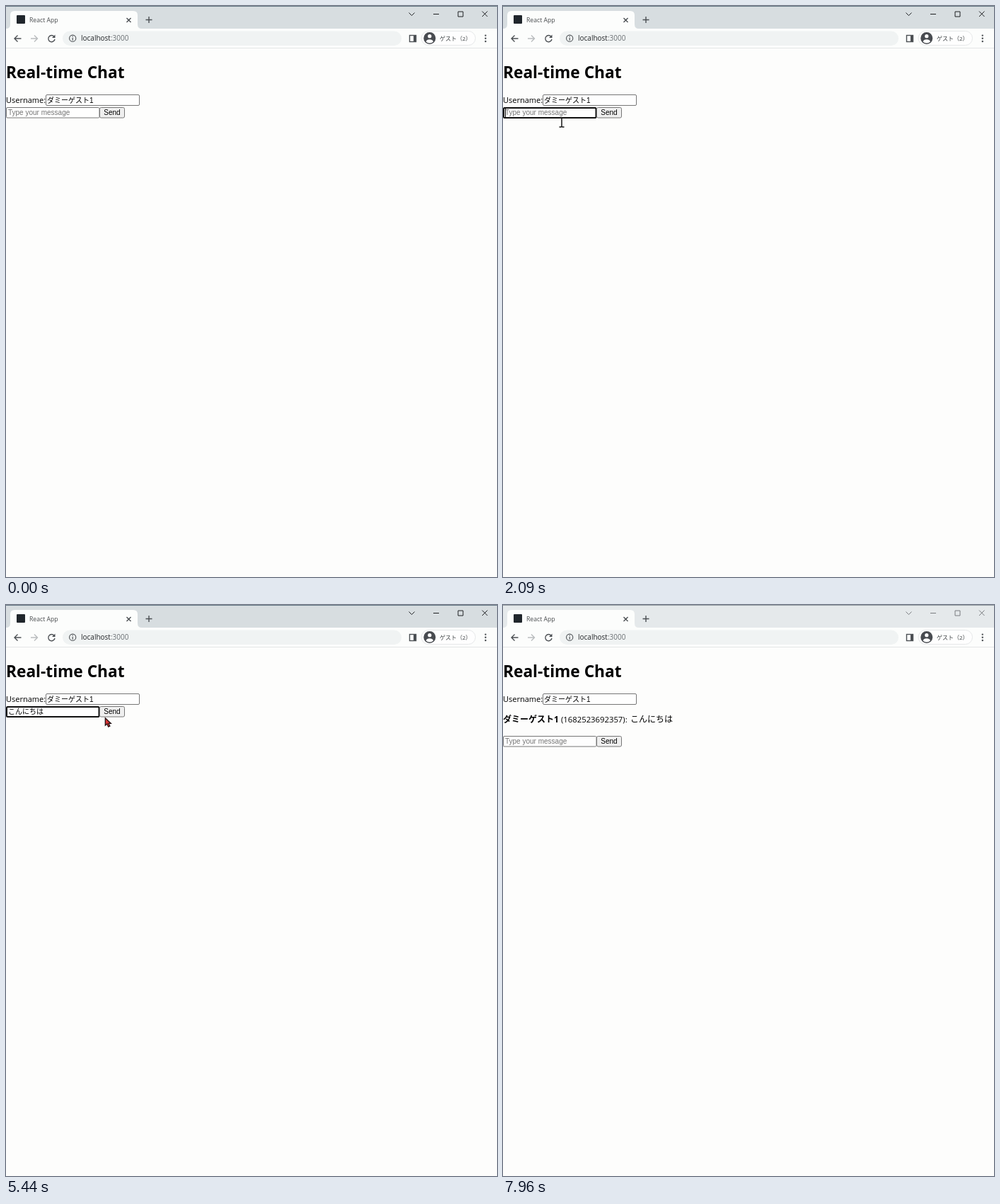
Animation, 694 px wide and 807 px high, one loop 8000 ms. Source, as an HTML page:

```html
<!DOCTYPE html>
<html lang="ja">
<head>
<meta charset="utf-8">
<title>Real-time Chat</title>
<style>
  html, body { margin: 0; width: 100%; height: 100%; overflow: hidden; background: #fdfdfc; }
  svg { display: block; }
  text { white-space: pre; }
  .ui { font-family: "Open Sans", "Noto Sans CJK JP", "Noto Sans CJK", sans-serif; }
  .field { font: 10px "Liberation Sans", "Noto Sans CJK JP", "Noto Sans CJK", sans-serif; }
  .line { fill: none; stroke: #4c5054; stroke-width: 1.4; }
  .box { fill: #fefefe; stroke: #767676; }
</style>
</head>
<body>
<svg width="694" height="807" viewBox="0 0 694 807">
  <!-- Browser frame -->
  <rect id="strip" width="694" height="32"/>
  <rect id="edge" width="694" height="1"/>
  <path d="M0 32Q6 32 6 26V13Q6 7 12 7H180Q186 7 186 13V26Q186 32 192 32Z" fill="#fcfdfc"/>
  <rect y="32" width="694" height="27" fill="#fcfdfc"/>
  <rect y="59" width="694" height="1" fill="#e3e6e6"/>
  <rect x="15" y="13" width="12" height="12" rx="1" fill="#20262c"/>
  <text class="ui" x="33" y="23" font-size="8.7" fill="#4a4d50">React App</text>
  <path class="line" d="M170.500 17l6 6m0-6l-6 6M197.500 19.500h9m-4.500-4.500v9" stroke="#333"/>
  <g id="controls" fill="none">
    <path d="M569.500 9.500l4 4 4-4M604 11.500h8M639 8h7v7h-7zM673 7.500l7.500 7.500m0-7.500l-7.500 7.500"/>
  </g>
  <path class="line" d="M21.500 46H12m4.500-4.500L12 46l4.500 4.500"/>
  <path class="line" d="M35 46h9.500m-4.500-4.500l4.500 4.500-4.500 4.500" style="stroke:#b9bcbe"/>
  <path class="line" d="M68 43.200A4.600 4.600 0 1 0 69 47"/>
  <path d="M69.500 40.500v4.500H65z" fill="#4c5054"/>
  <rect x="80" y="35.500" width="479" height="20.500" rx="10.200" fill="#f0f3f3"/>
  <circle class="line" cx="94.200" cy="45.700" r="4.600" style="stroke-width:1.100"/>
  <path class="line" d="M94.200 45v3.500M94.200 42.800v1.200" style="stroke-width:1.200"/>
  <text class="ui" x="106" y="49" font-size="10" fill="#25282b">localhost<tspan fill="#6b7074">:3000</tspan></text>
  <rect class="line" x="570.500" y="41.500" width="9" height="9"/>
  <path d="M576 41h4v10h-4z" fill="#4c5054"/>
  <rect x="587" y="35.500" width="76.500" height="20" rx="10" fill="#fefefe" stroke="#e6e8e9"/>
  <circle cx="598.800" cy="45.500" r="8.500" fill="#484b50"/>
  <circle cx="598.800" cy="42.700" r="2.600" fill="#fff"/>
  <path d="M593.600 50.200q1-3 5.200-3t5.200 3q-2 2.200-5.200 2.200t-5.200-2.200z" fill="#fff"/>
  <text class="ui" x="613" y="49" font-size="8" fill="#3c4043">ゲスト（2）</text>
  <g fill="#4c5054">
    <circle cx="677.800" cy="41.600" r="1.200"/><circle cx="677.800" cy="45.800" r="1.200"/><circle cx="677.800" cy="50" r="1.200"/>
  </g>

  <!-- Page -->
  <text class="ui" x="0" y="102" font-size="22.7" font-weight="700">Real-time Chat</text>
  <text class="ui" x="0" y="137" font-size="11">Username:</text>
  <rect class="box" x="56.500" y="125.500" width="132" height="15" rx="1.500"/>
  <text class="field" x="58" y="137">ダミーゲスト1</text>
  <g id="message" class="ui" font-size="11.3">
    <text x="0" y="166" font-size="12" font-weight="700">ダミーゲスト1</text>
    <text x="82" y="166">(1682523692357):</text>
    <text x="180" y="166" font-size="12">こんにちは</text>
  </g>
  <g id="form">
    <rect id="input" class="box" x=".5" y="143.500" width="131.500" height="14.500" rx="1.500"/>
    <rect id="ring" x="1" y="144" width="130.500" height="14" rx="1.500" fill="none" stroke="#101010" stroke-width="2"/>
    <text id="value" class="field" x="3" y="154"></text>
    <path id="underline" stroke="#333" stroke-dasharray="1 1"/>
    <rect id="caret" y="145" width="1" height="12"/>
    <rect id="button" x="132.500" y="143.500" width="35" height="14.500" rx="2" stroke="#767676"/>
    <text class="field" x="138.300" y="154">Send</text>
  </g>

  <path id="arrow" d="M.8.800V11.200L3.300 9.100 5.200 13.200 7.300 12.300 5.500 8.300H8.800Z" fill="#d93636" stroke="#241214" stroke-width="1.300"/>
  <path id="beam" d="M-3.500-6.500H-1L0-5.500 1-6.500H3.500M0-5.500V5.500M-3.500 6.500H-1L0 5.500 1 6.500H3.500" fill="none" stroke="#151515" stroke-width="1.500"/>
</svg>
<script>
const LOOP = 8000, FOCUS = 2060, PRESS = 5800, SENT = 5900, BLUR = 7560;
const $ = id => document.getElementById(id);
const show = (id, on) => $(id).style.display = on ? '' : 'none';
const set = (id, attrs) => {
  for (const name in attrs) $(id).setAttribute(name, attrs[name]);
};

// Pointer stops: time, x, y
const path = [
  [460, 1, 166], [700, 22, 180], [1160, 54, 190], [1290, 55, 191],
  [1420, 59, 200], [1560, 64, 191], [2060, 80, 158], [4880, 80, 158],
  [5060, 98, 173], [5250, 130, 171], [5440, 139.500, 159], [5670, 146, 154],
  [5970, 149.500, 152], [6170, 149.500, 152], [6500, 86, 165],
  [6900, 86, 165], [6970, 65, 168]
];

// Input method text: time, text
const typed = [
  [2880, 'ｋ'], [3000, 'こ'], [3300, 'こｎ'], [3420, 'こん'], [3560, 'こんｎ'],
  [3750, 'こんに'], [3860, 'こんにｃ'], [3980, 'こんにち'],
  [4150, 'こんにちｈ'], [4310, 'こんにちは']
];

const within = (t, from, to) => t >= from && t < to;
const mix = (a, b, k) => a + (b - a) * k;
const progress = (t, from, to) => Math.min(1, Math.max(0, (t - from) / (to - from)));
const rgb = (a, b, k) => `rgb(${a.map((v, i) => Math.round(mix(v, b[i], k)))})`;

function pointerAt(t) {
  const i = path.findIndex(p => p[0] > t);
  if (i < 1) return path[i ? path.length - 1 : 0];
  const a = path[i - 1], b = path[i];
  const k = progress(t, a[0], b[0]);
  return a.map((v, n) => mix(v, b[n], k));
}

function drawWindow(t) {
  const fade = progress(t, BLUR, BLUR + 70);
  set('strip', { fill: rgb([215, 221, 224], [229, 233, 235], fade) });
  set('edge', { fill: rgb([105, 124, 137], [151, 159, 165], fade) });
  set('controls', { stroke: rgb([30, 32, 34], [122, 125, 128], fade) });
}

function drawForm(t) {
  const focused = within(t, FOCUS, PRESS);
  const sent = t >= SENT;
  const entry = typed.filter(e => e[0] <= t).pop();
  const text = entry && !sent ? entry[1] : '';
  const end = 3 + text.length * 10;

  show('message', sent);
  set('form', { transform: `translate(0 ${sent ? 42 : 0})` });
  show('ring', focused);
  $('value').textContent = text || 'Type your message';
  set('value', { fill: text ? '#000' : '#757575' });
  show('underline', text && t < 4740);
  set('underline', { d: `M4 156.500H${end}` });
  show('caret', within(t, FOCUS, 2620) || within(t, 2880, 4880));
  set('caret', { x: end });
  set('button', { fill: within(t, 5600, SENT) ? '#e5e5e5' : '#efefef' });
}

function drawPointer(t) {
  const [, x, y] = pointerAt(t);
  const beam = within(t, FOCUS, 5000);
  show('beam', beam);
  show('arrow', !beam && within(t, 460, 7000));
  set('beam', { transform: `translate(${x + 3} ${y + 6.500})` });
  set('arrow', { transform: `translate(${x} ${y})` });
}

function frame(now) {
  const t = now % LOOP;
  drawWindow(t);
  drawForm(t);
  drawPointer(t);
  requestAnimationFrame(frame);
}
frame(0);
</script>
</body>
</html>
```
